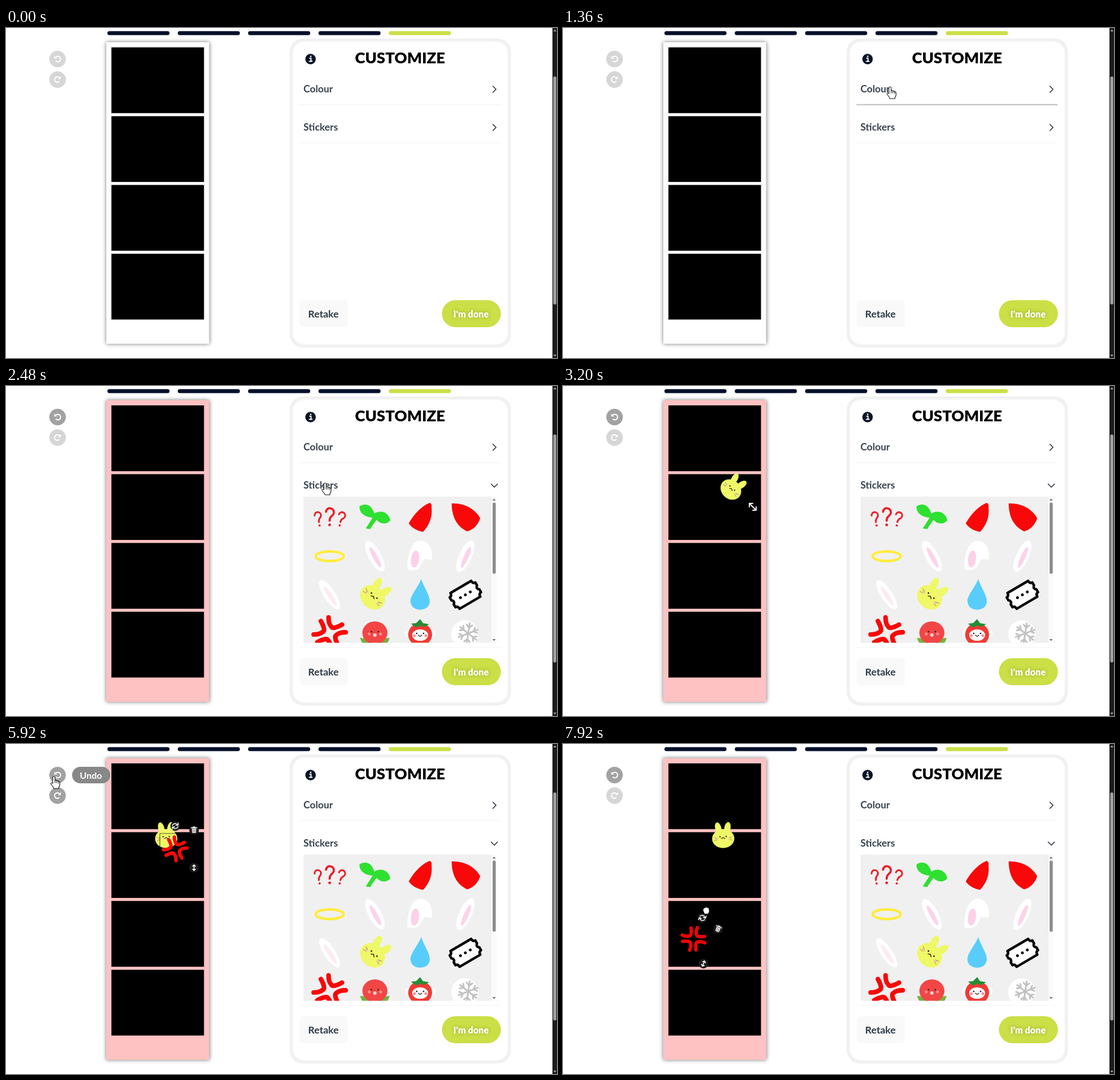
An HTML page with a canvas that plays this animation: 967 px wide and 579 px high, repeating every 8 s.

```html
<!DOCTYPE html>
<html lang="en">
<head>
<meta charset="utf-8">
<title>Photo strip editor</title>
<style>
html, body { margin: 0; width: 100%; height: 100%; overflow: hidden; background: #fff; }
canvas { display: block; }
</style>
</head>
<body>
<canvas id="stage" width="967" height="579"></canvas>
<script>
const ctx = document.getElementById('stage').getContext('2d');
const LOOP = 8000, NAVY = '#02102a', LIME = '#cbdf46', RED = '#f80808', INK = '#37434f';
const SWATCHES = ['#fff', '#000', '#ffc2c2', '#9c0000', '#ffcba6', '#fb963d', '#fff182', '#f0ffb0',
  '#9cc02e', '#8be6c0', '#a8fbe9', '#1d7fcb', '#b8dcfa', '#f3cdfb', '#6d49d8', '#de466d'];

// Keyframes: [time, ...values]
const CURSOR = [[900, 700, 250], [1280, 574, 103], [1460, 574, 103], [1720, 833, 149], [1900, 833, 149],
  [2120, 630, 148], [2200, 630, 148], [2340, 574, 104], [2440, 560, 170], [2520, 560, 170],
  [2680, 648, 368], [2800, 648, 368], [3120, 333, 212], [3300, 333, 212], [3440, 298, 178],
  [3760, 281, 161], [3880, 281, 121], [4240, 253, 133], [4400, 234, 107], [4520, 234, 107],
  [4860, 568, 433], [4960, 568, 433], [5200, 297, 185], [5360, 260, 220], [5760, 84, 57],
  [6880, 84, 57], [7280, 297, 185], [7440, 297, 185], [7640, 229, 342], [7720, 229, 302],
  [7880, 251, 292], [8000, 251, 292]];
const CURSOR_KINDS = [[900, 'arrow'], [1260, 'hand'], [2820, 'arrow'], [3100, 'resize'], [3340, 'grab'],
  [4280, 'arrow'], [4780, 'hand'], [5000, 'arrow'], [5200, 'grab'], [5400, 'arrow'], [5720, 'hand'],
  [6920, 'arrow'], [7240, 'grab']];
const BUNNY = [[3440, 298, 178, 0], [3760, 281, 161, 0], [3880, 281, 161, 0], [4240, 281, 161, -Math.PI / 4]];
const ANGER = [[5200, 297, 184, 0], [5360, 260, 220, 0], [5839, 260, 220, 0], [5840, 297, 184, 0],
  [7440, 297, 184, 0], [7640, 229, 342, 0], [7720, 229, 342, 0], [7880, 229, 342, 0.4]];

function tween(keys, t) {
  const i = keys.findIndex(k => k[0] > t);
  if (i === 0) return keys[0].slice(1);
  if (i < 0) return keys[keys.length - 1].slice(1);
  const a = keys[i - 1], b = keys[i], p = (t - a[0]) / (b[0] - a[0]), e = p * p * (3 - 2 * p);
  return a.slice(1).map((v, j) => v + (b[j + 1] - v) * e);
}
const latest = (steps, t) => steps.filter(s => s[0] <= t).pop()?.[1];
const within = (t, from, to) => t >= from && t < to;

function place(x, y, angle, scale, draw) {
  ctx.save();
  ctx.translate(x, y);
  ctx.rotate(angle);
  ctx.scale(scale, scale);
  draw();
  ctx.restore();
}
function paint(path, fill, stroke, width = 1) {
  if (fill) { ctx.fillStyle = fill; ctx.fill(path); }
  if (stroke) { ctx.strokeStyle = stroke; ctx.lineWidth = width; ctx.stroke(path); }
}
const shape = (d, ...style) => paint(new Path2D(d), ...style);
function oval(x, y, rx, ry, angle, ...style) {
  const p = new Path2D();
  p.ellipse(x, y, rx, ry, angle, 0, 7);
  paint(p, ...style);
}
const disc = (x, y, r, ...style) => oval(x, y, r, r, 0, ...style);
function box(x, y, w, h, r, ...style) {
  const p = new Path2D();
  p.roundRect(x, y, w, h, r);
  paint(p, ...style);
}
function text(s, x, y, size, color, align = 'left', weight = 700) {
  ctx.font = `${weight} ${size}px Lato, sans-serif`;
  ctx.textAlign = align;
  ctx.fillStyle = color;
  ctx.fillText(s, x, y);
}
function glow(color, blur, draw) {
  ctx.save();
  ctx.shadowColor = color;
  ctx.shadowBlur = blur;
  draw();
  ctx.restore();
}

// Stickers, each around its own centre
const ear = (angle, rx, pink) => () => {
  oval(0, 0, rx, 30, angle, '#fff');
  oval(1, 2, rx * 0.38, 20, angle, pink);
};
function question(x, y, scale, angle) {
  place(x, y, angle, scale, () => {
    shape('M-6,-8 C-5,-17 8,-15 7,-6 C6,0 0,-2 0,7', null, '#e8202a', 3.6);
    disc(0, 14, 2.3, '#e8202a');
  });
}
function bunny() {
  place(0, 0, 0.75, 1, () => {
    for (const s of [-1, 1]) oval(s * 8, -13, 5.5, 11, s * 0.22, '#eff866');
    oval(0, 5, 19.5, 16.5, 0, '#eff866');
    for (const s of [-1, 1]) {
      disc(s * 5.5, 1.5, 1.2, '#222');
      oval(s * 12, 5, 3, 1.7, 0, '#f6cfa2');
      shape(`M${s * 11},4 l${s * 5},-2 M${s * 11},7 l${s * 5},1`, null, '#8d8550', 0.7);
    }
    shape('M-3,5 L0,3 L3,5', null, '#222', 1.2);
  });
}
function anger(color = RED) {
  for (let i = 0; i < 4; i++)
    place(0, 0, i * Math.PI / 2 - 0.36, 1, () => shape('M-5,-19 Q-3,-5 -8,-5 Q-12,-3 -20,-6', null, color, 6));
}
function face(y) {
  for (const s of [-1, 1]) {
    disc(s * 6, y, 1.4, '#222');
    disc(s * 10, y + 4, 2.5, '#ff8d8d');
  }
}
const STICKERS = [
  () => { question(-20, 2, 0.85, -0.2); question(0, -2, 1.05, 0); question(20, 2, 0.85, 0.2); },
  () => shape('M-4,0 C-18,-1 -28,-9 -27,-20 C-16,-27 -5,-22 -1,-7 C10,-15 25,-9 27,5 C20,13 9,11 3,4 C0,8 -5,14 -8,20 L-16,19 Q-9,8 -4,0Z', '#2ee02f'),
  () => shape('M17,-26 C5,-22 -10,-8 -20,10 C-15,18 -5,23 5,25 C15,15 22,0 20,-18 Q21,-24 17,-26Z', RED),
  () => shape('M-24,-25 C0,-26 18,-14 26,1 C22,14 12,22 3,24 C-14,16 -24,0 -24,-25Z', RED),
  () => oval(0, 0, 24.5, 8.5, 0, null, '#ffec3d', 4.5),
  ear(-0.5, 11, '#fbd3ea'),
  () => {
    shape('M-22,23 C-24,2 -16,-27 0,-27 C16,-28 24,-10 20,7 Q8,2 5,8 C0,22 -8,27 -22,23Z', '#fff');
    oval(-9, 5, 7, 15, 0.12, '#fcd0e8');
  },
  ear(0.42, 11, '#fbd3ea'),
  ear(-0.58, 10, '#fdeaf2'),
  () => place(0, 0, 0, 1.2, bunny),
  () => shape('M2,-28 C6,-14 17,0 17,11 C17,31 -17,31 -17,11 C-17,0 -3,-14 2,-28Z', '#58cdfb'),
  () => place(0, 0, -0.53, 1, () => {
    shape('M-21,-16 H21 Q21,-10 26,-10 V-4 Q21,0 26,4 V10 Q21,10 21,16 H-21 Q-21,10 -26,10 V4 Q-21,0 -26,-4 V-10 Q-21,-10 -21,-16Z', '#fff', '#0a0a0a', 4.5);
    for (const x of [-10, 0, 10]) disc(x, 0, 2.5, '#0a0a0a');
  }),
  () => place(0, 0, 0, 1.35, anger),
  () => {
    shape('M-26,8 Q-10,8 0,24 Q10,8 26,8 Q20,28 0,26 Q-20,28 -26,8Z', '#75b23e');
    oval(0, -1, 22, 20, 0, '#f24646');
    face(-3);
    disc(0, 3, 3, '#ffd7d0');
  },
  () => {
    disc(-19, 0, 7, '#fff'); disc(20, 0, 7, '#fff');
    oval(0, 2, 21, 20, 0, '#f03b35');
    oval(0, 3, 14, 10, 0, '#fff');
    face(0);
    shape('M-3,3 Q0,7 3,3', null, '#222', 1.3);
    shape('M-16,-17 L-7,-18 L0,-25 L5,-18 L16,-16 L6,-11 L0,-14 L-7,-10Z', '#238d35');
  },
  () => {
    disc(-1, 1, 24, '#fff');
    for (let i = 0; i < 6; i++)
      place(5, 0, i * Math.PI / 3 + 0.15, 1, () => shape('M0,0 V-18 M-5,-15 L0,-10 L5,-15', null, '#c2c2c2', 3));
  }
];

// Selection handles
const DOUBLE_ARROW = 'M0,-5 V5 M-2.5,-2.5 L0,-5 L2.5,-2.5 M-2.5,2.5 L0,5 L2.5,2.5';
function handle(x, y, draw) {
  place(x, y, 0, 1, () => { disc(0, 0, 8.5, '#1c1c1c'); draw(); });
}
function handles(k) {
  ctx.strokeStyle = 'rgba(0,0,0,.65)';
  ctx.lineWidth = 1.2;
  const half = k - 6;
  ctx.strokeRect(-half, -half, 2 * half, 2 * half);
  handle(0, -k - 7, () => {
    for (const a of [0, Math.PI])
      place(0, 0, a, 1, () => shape('M-5,-1 Q-3,-5 1,-4.5 L4.5,-2 M5,-5.5 V-1.5 H1', null, '#fff', 1.5));
  });
  handle(k, -k, () => {
    shape('M-3.7,-2.5 H3.7 L3.2,5 H-3.2Z', '#fff');
    shape('M-5,-4 H5 M-1.5,-5.2 H1.5', null, '#fff', 1.4);
    shape('M-1.3,-1 V3.5 M1.3,-1 V3.5', null, '#333', 0.9);
  });
  handle(k, k, () => shape(DOUBLE_ARROW, null, '#fff', 1.6));
}
function placed(keys, t, draw, selected, k) {
  const [x, y, angle] = tween(keys, t);
  place(x, y, angle, 1, () => {
    draw();
    if (selected) handles(k);
  });
}

const POINTERS = {
  arrow: () => shape('M0,0 V15 L3.6,11.8 L6,17 L8.4,16 L6,10.8 H10.5Z', '#fff', '#111', 0.8),
  hand: () => shape('M-2,12 V1.5 Q0,-1.5 2,1.5 V7 Q4,5.5 5,7.8 Q7,6.6 8,8.8 Q10,8 10.5,11 Q11,16 8.5,19 V21 H0 Q-2,17 -5.5,13 Q-5,9.5 -2,12Z M2,7 V11 M5,8 V11 M8,9 V12', '#fff', '#111', 1.1),
  resize: () => place(0, 0, -Math.PI / 4, 1.7, () => shape(DOUBLE_ARROW, null, '#fff', 1.1)),
  grab: () => shape('M-5,0 Q-6,-3 -3.5,-3 Q-3,-6 -1,-4.5 Q0,-7 2,-4.5 Q5,-6 5,-2 Q7,2 3.5,6 H-2.5Z', '#fff', '#111', 0.6)
};

function roundButton(y, mirror, active) {
  ctx.save();
  ctx.translate(90.5, y);
  disc(0, 0, 14.5, active ? '#a2a2a2' : '#d6d6d6');
  ctx.scale(mirror, 1);
  const p = new Path2D();
  p.arc(0.5, 0, 4.8, -2.6, 2.3);
  paint(p, null, '#fff', 2);
  shape('M-5.8,-6 V-1 H-0.8Z', '#fff');
  ctx.restore();
}
function section(label, y, open, bottom, cursor) {
  text(label, 522, y + 5.5, 17.3, INK);
  place(857, y, open ? Math.PI / 2 : 0, 1, () => shape('M-2.5,-5.5 L3,0 L-2.5,5.5', null, '#26313c', 1.6));
  const hover = cursor && within(cursor[0], 515, 868) && within(cursor[1], y - 24, bottom);
  const lit = hover && !(open && label === 'Stickers');
  ctx.fillStyle = lit ? (open ? '#b5bacb' : '#bdbdbd') : '#f3f3f3';
  ctx.fillRect(515, bottom - (lit ? 1 : 0.5), 353, lit ? 2 : 1);
}
function swatches() {
  ctx.fillStyle = '#f0f0f0';
  ctx.fillRect(522, 127, 339, 86);
  SWATCHES.forEach((c, i) => disc(548.5 + 40.8 * (i % 8), i < 8 ? 148.5 : 192, 17.2, c, '#080808', 1.9));
}
function stickerList() {
  ctx.save();
  ctx.beginPath();
  ctx.rect(522, 194, 339, 256.5);
  ctx.clip();
  ctx.fillStyle = '#f0f0f0';
  ctx.fillRect(522, 194, 330, 257);
  ctx.fillStyle = '#fafafa';
  ctx.fillRect(852, 194, 9, 257);
  STICKERS.forEach((draw, i) => place(568 + 79.4 * (i % 4), 231 + 67.7 * Math.floor(i / 4), 0, 1, draw));
  box(854, 204.5, 5.5, 125, 2.7, '#8c8c8c');
  shape('M853.5,201 L856.5,197.5 L859.5,201Z M853.5,444 L856.5,447.5 L859.5,444Z', '#777');
  ctx.restore();
}

function strip(color) {
  glow('rgba(0,0,0,.55)', 7, () => box(176, 25, 180.5, 529, 0, color));
  ctx.fillStyle = '#000';
  for (let i = 0; i < 4; i++) ctx.fillRect(185, 34 + 120.7 * i, 162.5, 115.4);
}
function panel(t, cursor) {
  box(498, 18.5, 388, 542, 23, '#f0f0f0');
  glow('#fff', 4, () => box(504, 24.5, 376, 530, 19, '#fff'));
  disc(534.5, 54.5, 9.2, '#071425');
  shape('M533,53 H535.3 V58 M532.3,58.5 H537.2', null, '#fff', 1.9);
  disc(534.8, 49.8, 1.4, '#fff');
  text('CUSTOMIZE', 691.5, 61.5, 27.2, '#000', 'center', 900);

  const coloursOpen = within(t, 1440, 2360), stickersOpen = t >= 2480;
  const shift = coloursOpen ? 87 : 0;
  section('Colour', 107.5, coloursOpen, 134.5 + shift, cursor);
  section('Stickers', 174.5 + shift, stickersOpen, stickersOpen ? 458.5 : 201.5 + shift, cursor);
  if (coloursOpen) swatches();
  if (stickersOpen) stickerList();

  box(515, 477.5, 85, 47.5, 7, '#f9f9f9');
  text('Retake', 557, 508, 17.5, '#2c3a47', 'center');
  box(765, 477.5, 103.5, 47.5, 23.7, LIME);
  glow('rgba(70,90,0,.4)', 6, () => text("I'm done", 816, 508, 16, '#fff', 'center', 900));
}
function pageScrollbar() {
  ctx.fillStyle = '#1c1c1c';
  ctx.fillRect(959, 0, 8, 579);
  box(960.3, 85, 5.6, 400, 2.8, '#a0a0a0');
  shape('M960.5,6 L963.2,2.5 L966,6Z M960.5,573 L963.2,576.5 L966,573Z', '#a0a0a0');
}

function render(t) {
  ctx.fillStyle = '#fff';
  ctx.fillRect(0, 0, 967, 579);
  ctx.lineCap = ctx.lineJoin = 'round';
  const kind = latest(CURSOR_KINDS, t), cursor = kind && tween(CURSOR, t);

  for (let i = 0; i < 5; i++) box(178 + 123.45 * i, 5.5, 109, 7, 3.5, i < 4 ? NAVY : LIME);
  strip(latest([[0, '#fff'], [1760, '#effdad'], [2160, '#ffc2c2']], t));
  roundButton(54.5, 1, t >= 1760);
  roundButton(90.5, -1, within(t, 5840, 7440));
  panel(t, cursor);
  pageScrollbar();

  if (t >= 2720) placed(BUNNY, t, bunny, t < 4940 && !within(t, 3100, 3340), 36);
  if (t >= 4940) placed(ANGER, t, () => anger(t >= 7440 ? '#e80505' : RED), true, 33);
  if (within(t, 5760, 6900)) {
    box(116, 40, 67, 29, 14.5, '#888');
    text('Undo', 149, 61, 16, '#fff', 'center');
  }
  if (kind) place(cursor[0], cursor[1], 0, 1, POINTERS[kind]);
}

const start = performance.now();
function frame() {
  render((performance.now() - start) % LOOP);
  requestAnimationFrame(frame);
}
frame();
</script>
</body>
</html>
```
